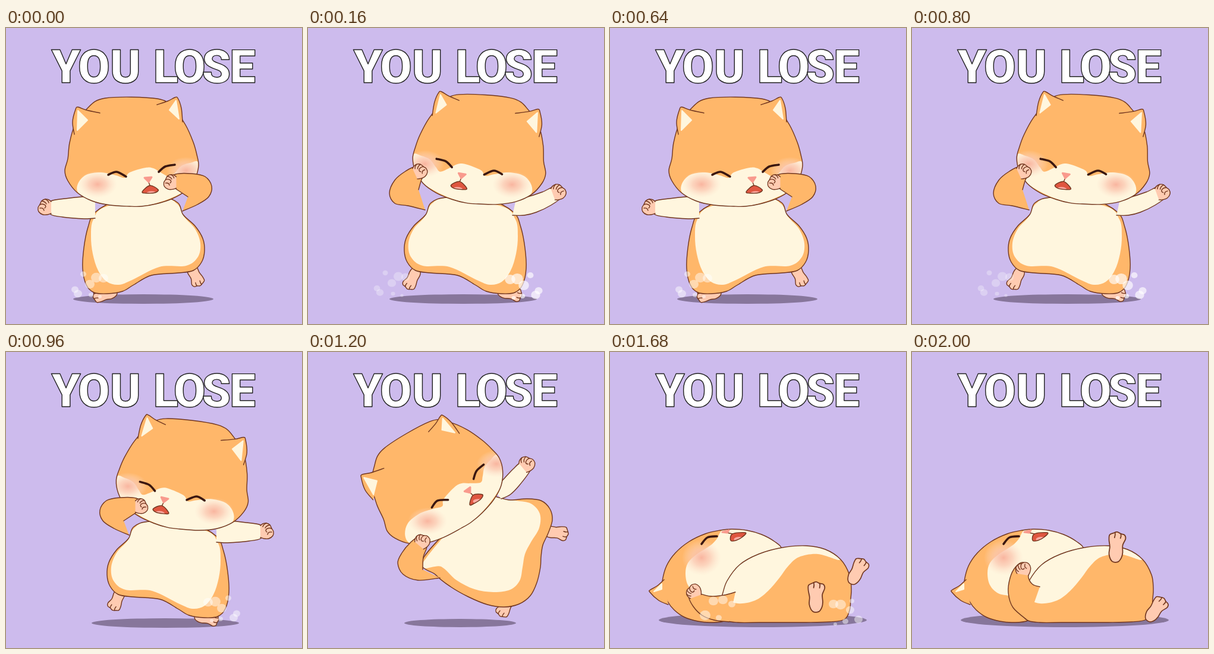
An HTML page that plays this animation: 498 by 498 pixels, repeating every 2080 ms.

```html
<!DOCTYPE html>
<html>
<head>
<meta charset="utf-8">
<title>You lose</title>
<style>
html, body { margin: 0; width: 100%; height: 100%; overflow: hidden; background: #cdbbed }
svg { display: block; width: 100vw; height: 100vh }
text { font: 900 78px Roboto, sans-serif; text-anchor: middle; fill: #fff; stroke: #222; stroke-width: 1.4; stroke-linejoin: round }
#stage path { stroke-linejoin: round; stroke-linecap: round }
</style>
</head>
<body>
<svg viewBox="0 0 498 498">
  <defs>
    <radialGradient id="blush">
      <stop offset="0" stop-color="#f9b59f"/>
      <stop offset=".45" stop-color="#fbc9b2" stop-opacity=".75"/>
      <stop offset="1" stop-color="#fde0cb" stop-opacity="0"/>
    </radialGradient>
  </defs>
  <text x="101 148 201 238 269 309 354 398" y="92">YOU LOSE</text>
  <g id="stage"></g>
</svg>
<script>
const ORANGE = '#ffb76a', CREAM = '#fff6de', PINK = '#ffcbb1', LINE = '#70361f', DARK = '#3a1710';
const WIDTH = 504; // mirror sum: x -> WIDTH - x
const STEP = 80, LOOP = 2080;

// Points run clockwise; central shapes start and end at the bottom middle,
// so a mirrored, reversed list matches point by point.
// hand and foot: x, y, angle, size, flip
const left = {
  shadow: [231, 456, 118, 8],
  side: [1],
  head: [208,300, 175,298, 145,291, 120,277, 104,257, 99,240, 104,220, 107,193, 116,163, 135,137, 167,118,
    255,119, 283,137, 302,163, 315,192, 321,213, 324,232, 318,253, 303,273, 280,287, 252,296, 228,300],
  mask: [208,300, 175,298, 145,291, 122,278, 121,262, 135,247, 160,243, 185,248, 200,252, 208,243, 235,235,
    248,236, 260,243, 276,251, 284,244, 295,232, 310,227, 323,226, 318,253, 303,273, 265,291, 228,300],
  earL: [115,179, 112,158, 117,137, 121,133, 135,138, 158,143],
  earR: [254,129, 272,123, 284,117, 289,118, 295,135, 297,158],
  innerL: [120,172, 121,139, 137,155],
  innerR: [275,138, 286,122, 291,153],
  cheekL: [154,263], cheekR: [303,240],
  eyeL: [172,247, 186,242, 202,250],
  eyeR: [257,242, 268,233, 284,230],
  nose: [233,252, 240,259, 245,251],
  mouth: [239,278, 229,276, 242,265, 256,272, 251,277],
  body: [215,432, 196,443, 170,447, 148,445, 135,432, 129,405, 131,370, 138,335, 150,310, 190,290,
    260,285, 289,294, 298,314, 318,333, 331,354, 334,375, 329,394, 315,408, 290,412, 245,416],
  belly: [212,424, 190,432, 170,427, 155,408, 146,380, 143,350, 147,322, 170,300,
    260,286, 288,296, 300,318, 318,338, 327,362, 323,385, 303,400, 258,402],
  armL: [150,283, 128,284, 100,287, 76,291, 68,302, 76,314, 95,318, 115,320, 135,321, 150,320],
  armR: [297,308, 322,297, 341,284, 346,266, 335,250, 312,245, 285,246, 270,258, 285,270, 306,284],
  handL: [65,301,0,1,1], handR: [276,259,0,.95,1],
  footL: [167,448,80,1,1], footR: [317,415,-25,1,1]
};

const HEAD = ['head', 'mask', 'earL', 'earR', 'innerL', 'innerR', 'cheekL', 'cheekR', 'eyeL', 'eyeR', 'nose', 'mouth'];
const FACE = HEAD.slice(6), EARS = HEAD.slice(2, 6);

const mapKeys = (pose, keys, fn) => ({ ...pose, ...Object.fromEntries(keys.map(k => [k, fn(pose[k], k)])) });
const shift = (pose, keys, dx, dy) => mapKeys(pose, keys, p => p.map((v, i) => v + (i % 2 ? dy : dx)));

function turnHead(pose, deg, dx, dy) {
  const c = Math.cos(deg * Math.PI / 180), s = Math.sin(deg * Math.PI / 180);
  return mapKeys(pose, HEAD, p => p.map((v, i) => {
    const x = p[i - i % 2] - 212, y = p[i - i % 2 + 1] - 205;
    return i % 2 ? 205 + x * s + y * c + dy : 212 + x * c - y * s + dx;
  }));
}

function mirror(pose) {
  const out = {};
  for (const k in pose) {
    const p = pose[k], to = k.replace(/[LR]$/, e => e == 'L' ? 'R' : 'L');
    if (k == 'side') out[to] = [-p[0]];
    else if (k == 'shadow') out[to] = [WIDTH - p[0], ...p.slice(1)];
    else if (/hand|foot/.test(k)) out[to] = [WIDTH - p[0], p[1], -p[2], p[3], -p[4]];
    else {
      out[to] = [];
      for (let i = p.length - 2; i >= 0; i -= 2) out[to].push(WIDTH - p[i], p[i + 1]);
    }
  }
  return out;
}

const land = {
  ...shift(turnHead(left, -4.6, 2, -4), ['body', 'belly'], 8, 0),
  shadow: [243, 456, 124, 8],
  armL: [154,288, 138,285, 110,276, 90,267, 80,272, 77,284, 95,298, 120,310, 140,315, 160,315],
  armR: [307,306, 336,299, 358,295, 367,278, 358,256, 340,241, 322,233, 306,241, 313,255, 318,272],
  handL: [82,275,20,1,1], handR: [315,240,25,.95,1],
  footL: [165,447,80,1,1], footR: [328,420,-28,1,1]
};
const settle = { ...turnHead(left, -7.5, -8, -2), shadow: [236, 456, 124, 8] };

const fall = {
  ...shift(shift(turnHead(left, -31, 0, 8), FACE, 9, -8), EARS, -6, 8),
  shadow: [256, 456, 94, 7],
  side: [-1],
  body: [391,362, 385,388, 374,410, 355,424, 330,429, 302,425, 270,412, 240,395, 215,375, 195,345,
    300,240, 318,244, 340,249, 368,247, 392,250, 407,264, 411,283, 404,305, 395,325, 392,345],
  belly: [361,362, 356,385, 340,400, 312,404, 280,399, 250,384, 224,361, 194,354,
    300,235, 325,246, 350,250, 375,255, 390,272, 389,296, 375,320, 365,340],
  armL: [193,366, 194,345, 200,325, 186,312, 172,321, 158,338, 151,355, 160,374, 185,384, 222,380],
  armR: [325,247, 340,240, 355,225, 374,199, 372,188, 358,186, 345,197, 330,213, 322,222, 315,235],
  handL: [193,317,-50,.95,-1], handR: [369,187,-40,1,-1],
  footL: [333,426,30,1,1], footR: [416,304,-82,1.05,1]
};

const lying = {
  shadow: [257, 451, 175, 12],
  side: [-1],
  head: [265,385, 245,410, 220,435, 195,452, 170,455, 148,453, 125,446, 108,434, 97,420, 88,400, 88,385,
    95,360, 110,338, 133,319, 160,306, 185,300, 205,298, 230,300, 255,307, 277,319, 289,332, 282,355],
  mask: [265,385, 235,415, 205,425, 185,412, 165,410, 145,406, 131,392, 127,372, 131,355, 145,341, 162,330,
    172,323, 180,314, 184,306, 188,300, 195,294, 205,290, 230,292, 260,302, 282,314, 294,332, 282,355],
  earL: [98,425, 82,418, 67,404, 68,400, 80,393, 91,383],
  earR: [95,362, 96,350, 104,342, 108,342, 116,338, 124,326],
  innerL: [74,403, 87,390, 87,399],
  innerR: [106,350, 106,344, 114,340],
  cheekL: [154,346], cheekR: [200,275],
  eyeL: [154,323, 164,312, 180,310],
  eyeR: [192,301, 198,298, 205,297],
  nose: [189,303, 197,304, 200,300],
  mouth: [212,317, 203,317, 206,306, 228,304, 223,311],
  body: [405,415, 403,435, 394,450, 370,454, 330,455, 290,455, 250,455, 215,455, 192,450, 182,428,
    189,408, 197,385, 218,358, 250,340, 290,329, 330,326, 362,332, 388,349, 403,375, 406,398],
  belly: [350,340, 318,345, 300,360, 285,380, 266,402, 244,418, 215,423, 189,412,
    185,395, 200,365, 235,335, 280,318, 320,318, 350,322, 375,335, 386,350],
  armL: [211,404, 192,409, 170,411, 150,406, 138,400, 132,410, 140,428, 155,443, 175,451, 200,454],
  armR: [300,340, 305,335, 312,332, 320,328, 322,325, 318,322, 310,322, 302,326, 296,330, 290,335],
  handL: [140,402,-110,.95,-1], handR: [318,326,-40,.9,-1],
  footL: [347,413,182,1.25,1], footR: [416,370,-150,1.15,1]
};
const kick = {
  ...lying,
  armL: [215,395, 203,391, 196,380, 196,366, 187,354, 174,362, 165,380, 162,405, 170,430, 195,452],
  handL: [187,364,-80,.95,-1],
  footL: [344,329,186,1.25,1], footR: [410,434,-142,1.15,1]
};

const keys = [
  [0, left], [160, mirror(land)], [320, mirror(settle)], [480, land],
  [640, left], [800, mirror(land)], [960, mirror(settle)],
  [1200, fall], [1440, kick], [1680, lying], [2000, kick]
];

function poseAt(t) {
  let i = keys.length - 1;
  while (keys[i][0] > t) i--;
  const [t0, a] = keys[i], [t1, b] = keys[i + 1] || [LOOP, a];
  const k = (t - t0) / (t1 - t0);
  return mapKeys(a, Object.keys(a), (p, key) => p.map((v, j) => v + (b[key][j] - v) * k));
}

// Smooth curve through the points
function curve(p, closed) {
  const n = p.length / 2;
  const at = i => {
    i = closed ? (i + n) % n : Math.max(0, Math.min(n - 1, i));
    return [p[2 * i], p[2 * i + 1]];
  };
  let d = 'M' + at(0);
  for (let i = 0; i < (closed ? n : n - 1); i++) {
    const a = at(i - 1), b = at(i), c = at(i + 1), e = at(i + 2);
    d += `C${b.map((v, j) => v + (c[j] - a[j]) / 6)} ${c.map((v, j) => v - (e[j] - b[j]) / 6)} ${c}`;
  }
  return d + (closed ? 'Z' : '');
}
const draw = (d, fill = 'none', stroke = LINE, w = 1.4) =>
  `<path d="${d}" fill="${fill}" stroke="${stroke}" stroke-width="${w}"/>`;
const ellipse = (x, y, rx, ry, fill, alpha = 1) =>
  `<ellipse cx="${x}" cy="${y}" rx="${rx}" ry="${ry}" fill="${fill}" opacity="${alpha}"/>`;
const clip = (id, d, inside) => `<clipPath id="${id}"><path d="${d}"/></clipPath><g clip-path="url(#${id})">${inside}</g>`;
const place = ([x, y, a, s, f], inside) =>
  `<g transform="translate(${x} ${y}) rotate(${a}) scale(${f < 0 ? -s : s} ${s})">${inside}</g>`;

const fist = draw(curve([11,-9, 7,-12, 1,-13, -5,-10, -8,-4, -11,1, -10,8, -3,13, 5,13, 11,11]), PINK)
  + draw('M-5-10Q1-9 3-5M-8-4Q-3-6 1-3Q3 0 0 2M1-13Q6-11 7-7M-8 2Q-2 1-1 6');
const sole = draw(curve([-9,-6, -8,4, -11,13, -9,18, -4,19, 1,21, 6,19, 11,16, 11,9, 9,0, 9,-10, 4,-19, -4,-19, -8,-13], true), PINK)
  + draw('M-4 19Q-5 16-4 13M4 20Q3 16 4 13');

const foot = f => place([...f.slice(0, 4), 1], sole);
const arm = (p, s, fill) => draw(curve(p['arm' + s]), fill) + place(p['hand' + s], fist);

function torso(p) {
  const d = curve(p.body, true);
  return draw(d, ORANGE, 'none') + clip('torso', d, draw(curve(p.belly, true), CREAM, 'none')) + draw(d);
}

function headOf(p, down) {
  const d = curve(p.head, true), sides = down ? ['L'] : ['L', 'R'];
  const [nx, ny] = p.nose.slice(2), m = p.mouth;
  const lips = curve(m, true);
  return draw(d, ORANGE, 'none')
    + clip('face', d, draw(curve(p.mask, true), CREAM, 'none')
      + ['L', 'R'].map(s => ellipse(...p['cheek' + s], 33, down ? 30 : 23, 'url(#blush)')).join(''))
    + draw(d)
    + sides.map(s => draw(curve(p['ear' + s]), ORANGE) + draw(`M${p['inner' + s]}Z`, CREAM, CREAM, 2)
      + draw(curve(p['eye' + s]), 'none', DARK, 3.6)).join('')
    + draw(`M${nx} ${ny}L${m[4]} ${m[5]}`)
    + draw(`M${p.nose}Z`, '#f99a8d', '#f99a8d', 3)
    + draw(lips, '#df5640', 'none')
    + clip('lips', lips, ellipse((m[0] + m[8]) / 2, (m[1] + m[9]) / 2 + 1, 9, 4, '#f9a9a0'))
    + draw(lips);
}

// x, y, radius of each puff
const stepDust = [130,414,5, 141,431,8, 152,420,9, 164,421,8, 116,440,6, 121,447,7, 143,449,4, 158,452,3];
const fallDust = [160,443,9, 174,419,8, 190,417,8, 205,424,6, 183,447,5, 376,424,8, 388,425,9, 404,434,7, 407,419,4, 396,453,5, 418,450,7, 379,458,3];

function puffs(list, age, flip) {
  let out = '';
  const alpha = .65 - age / 900;
  for (let i = 0; i < list.length; i += 3) {
    const x = list[i], r = list[i + 2] * (1.1 - age / 1600);
    out += ellipse(flip ? WIDTH - x : x, list[i + 1] + (160 - age) / 80, r, r * .92, '#fff', alpha);
  }
  return out;
}

function dust(t) {
  if (t >= 1520) return t < 1840 ? puffs(fallDust, t - 1520) : '';
  let out = '';
  for (let born = -160, flip = false; born <= 800; born += 320, flip = !flip)
    if (t >= born && t - born <= 320) out += puffs(stepDust, t - born, flip);
  return out;
}

function scene(t) {
  const p = poseAt(t), down = t >= 1440;
  const [bent, straight] = p.side[0] > 0 ? 'RL' : 'LR';
  const feet = foot(p.footL) + foot(p.footR);
  const parts = down
    ? [headOf(p, down), torso(p), arm(p, 'L', ORANGE), feet]
    : [feet, torso(p), arm(p, straight, CREAM), headOf(p), arm(p, bent, ORANGE)];
  return ellipse(...p.shadow, '#87769b') + parts.join('') + dust(t);
}

const stage = document.getElementById('stage'), start = performance.now();
let shown = -1;
function tick() {
  const t = Math.floor((performance.now() - start) % LOOP / STEP) * STEP;
  if (t != shown) stage.innerHTML = scene(shown = t);
  requestAnimationFrame(tick);
}
tick();
</script>
</body>
</html>
```
